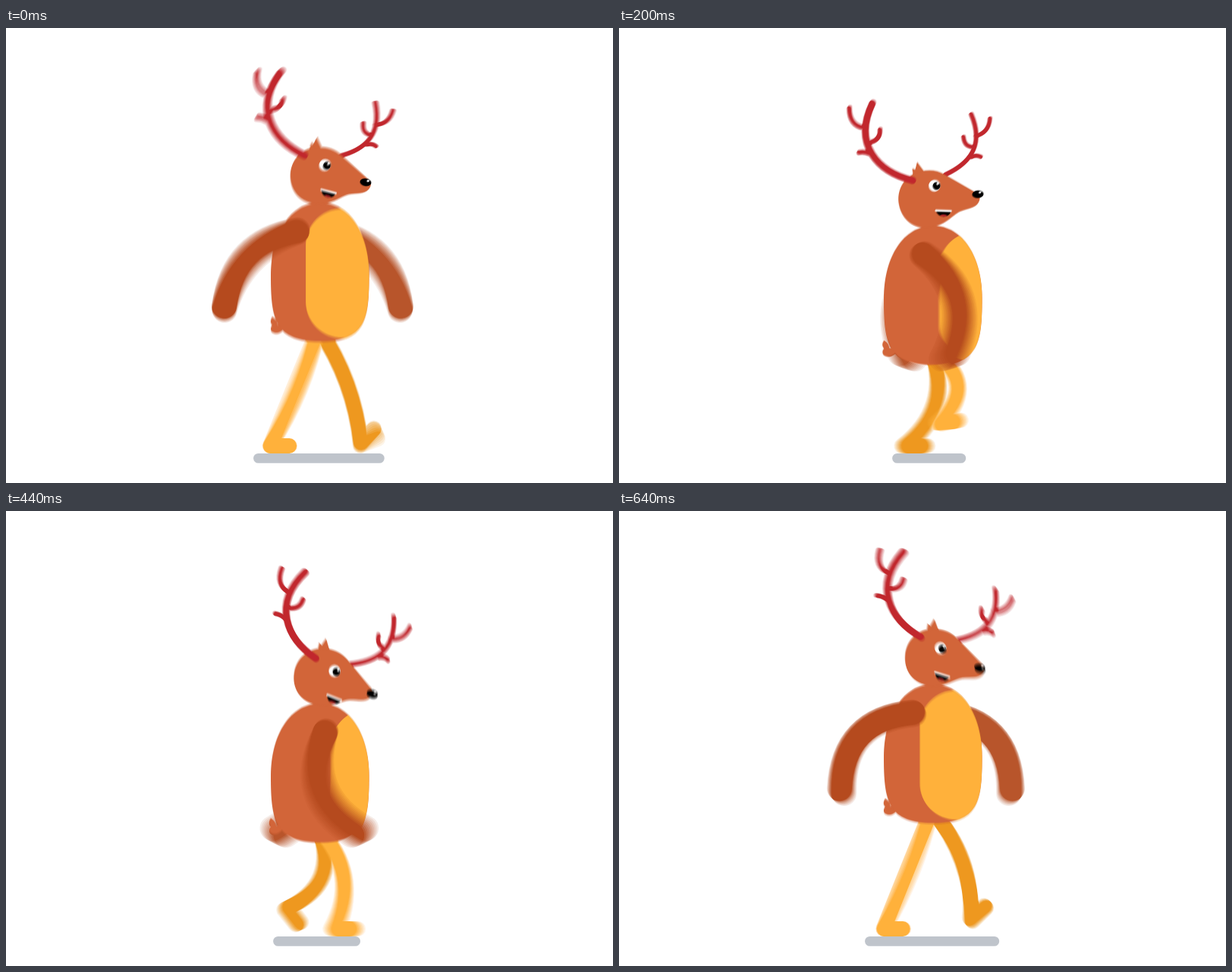
Write an HTML page with a canvas that moves like this. It is 800x600 px and loops after 680 ms.

```html
<!DOCTYPE html>
<html lang="en">
<head>
<meta charset="utf-8">
<title>Walking deer</title>
<style>
  html, body { margin: 0; width: 100%; height: 100%; overflow: hidden; background: #fff; }
  canvas { display: block; }
</style>
</head>
<body>
<canvas id="stage" width="800" height="600"></canvas>
<script>
const W = 800, H = 600;
const LOOP = 680, STEP = 40;
const SHUTTER = 24, SAMPLES = 10;
const LEG_LENGTH = 169, ARM_REACH = 139, FOOT = 25;
const COLOR = {
  skin: '#d26539', nearArm: '#b54a1e', farArm: '#b8552b',
  nearLeg: '#ffb13b', farLeg: '#ee981f', antler: '#c1272d', ground: '#bfc4cb'
};

const stage = document.getElementById('stage').getContext('2d');
const layer = document.createElement('canvas');
layer.width = W;
layer.height = H;
const g = layer.getContext('2d');

const { PI, sin, cos } = Math;
const mod = (a, n) => ((a % n) + n) % n;
const clamp = v => Math.min(1, Math.max(0, v));
const radians = degrees => degrees * PI / 180;
// Cosine over one loop, with its peak at the given time.
const wave = (t, peak) => cos(2 * PI * (t - peak) / LOOP);

// The body dips twice per loop, rising a little faster than it sinks.
function bodyDrop(t) {
  const a = 4 * PI * t / LOOP;
  return 15.5 - 17.5 * cos(a + 0.21 + 0.42 * cos(a - 0.43));
}

const bodyTurn = t => 21 * (1 - wave(t, 0));
const headTilt = t => -0.204 * wave(t, 174);

// The foot swings forward for u in 0..1, then stays on the ground.
function footPose(t) {
  const u = mod(t - 20, LOOP) / 330;
  const lift = u < 1 ? 32 * sin(PI * u ** 0.8) : 0;
  const pitch = u < 0.5
    ? 53 * sin(2 * PI * u)
    : -48 * sin(PI * (u - 0.5)) * clamp((1.03 - u) * 16);
  return {
    x: 403 + 60 * wave(t, 330) + 5 * wave(2 * t, 0),
    y: 551 - lift,
    pitch: radians(pitch)
  };
}

const SHAPE = {
  torso: new Path2D('M414 229C375 229 349 270 349 325C349 385 355 412.5 414 412.5C473 412.5 478.5 385 478.5 325C478.5 270 453 229 414 229Z'),
  tail: new Path2D('M351 380C357 383 357 387 358 390L370 390C366 400 358 403 353 401C348 400 348 393 351 391C348 388 348 384 351 380Z'),
  skull: new Path2D('M411 231C388 231 374.5 214 374.5 194C374.5 172 391 156 412 156C424 156 433 159 441 166L475 196C481 200 483 205 478 211C472 218 462 216 452 218C440 221 432 231 411 231Z'),
  ear: new Path2D('M400 164L401 150L404.500 152.500L409 143L417 160Z'),
  mouth: new Path2D('M415 211L435 216Q432 223 424 222Q416 220 415 211Z'),
  tongue: new Path2D('M419 219.500Q424 217.500 429 221.500Q424 223 419 219.500Z'),
  teeth: new Path2D('M415.500 212L434.500 216.500'),
  antlerNear: new Path2D('M393 167C350 147 325 105 361 57'),
  tinesNear: new Path2D('M343 86C332 82 327 72 330 57M346 107Q362 107 364 93M344 121Q338 117 331 117'),
  antlerFar: new Path2D('M437 168C470 160 495 142 486 97'),
  tinesFar: new Path2D('M486 126Q504 125 509 107M470 124C469 135 474 138 481 140M475 152Q482 150 487 154')
};

function fill(path, color) {
  g.fillStyle = color;
  g.fill(path);
}

function stroke(path, color, width) {
  g.strokeStyle = color;
  g.lineWidth = width;
  g.stroke(path);
}

function oval(x, y, rx, ry, color, angle = 0) {
  g.fillStyle = color;
  g.beginPath();
  g.ellipse(x, y, rx, ry, angle, 0, 2 * PI);
  g.fill();
}

function shifted(x, y, draw) {
  g.save();
  g.translate(x, y);
  draw();
  g.restore();
}

// A curved limb whose middle is pushed sideways by the bend.
function limb(x0, y0, x1, y1, bend) {
  const dx = x1 - x0, dy = y1 - y0, length = Math.hypot(dx, dy);
  const path = new Path2D();
  path.moveTo(x0, y0);
  path.quadraticCurveTo(
    (x0 + x1) / 2 + bend * dy / length,
    (y0 + y1) / 2 - bend * dx / length, x1, y1);
  return path;
}

function drawLeg(t, drop, color) {
  const hipX = 412, hipY = 395 + drop;
  const { x, y, pitch } = footPose(t);
  const slack = LEG_LENGTH ** 2 - (x - hipX) ** 2 - (y - hipY) ** 2;
  const leg = limb(hipX, hipY, x, y, 0.43 * Math.sqrt(Math.max(0, slack)));
  leg.lineTo(x + FOOT * cos(pitch), y + FOOT * sin(pitch));
  stroke(leg, color, 20);
}

function drawArm(t, drop, far) {
  const sway = 21 * (1 - wave(t, 40));
  const swing = radians(-2 - 42 * wave(t, -14));
  const bend = -6 - 64 * Math.tanh(2.2 * wave(t, 545));
  const side = far ? -1 : 1;
  const x = far ? 425 - 0.53 * sway : 382 + sway;
  const y = 267 + drop;
  const arm = limb(x, y,
    x + side * ARM_REACH * sin(swing), y + ARM_REACH * cos(swing), side * bend);
  stroke(arm, far ? COLOR.farArm : COLOR.nearArm, 33);
}

function drawTorso(drop, turn) {
  g.save();
  g.translate(0, drop);
  shifted(-0.06 * turn, 0, () => fill(SHAPE.tail, COLOR.skin));
  fill(SHAPE.torso, COLOR.skin);
  g.clip(SHAPE.torso);
  const belly = new Path2D();
  belly.roundRect(395 + turn, 237, 110, 171, 48);
  fill(belly, COLOR.nearLeg);
  g.restore();
}

function drawHead(t, drop, turn) {
  const tilt = headTilt(t);
  // Face and antlers slide over the skull as the head turns.
  const slide = draw => shifted(0.2 * turn, 14 * tilt + 0.05 * turn, draw);
  g.save();
  g.translate(411, 225 + drop);
  g.rotate(tilt);
  g.translate(-411, -225);
  slide(() => {
    stroke(SHAPE.antlerFar, COLOR.antler, 6);
    stroke(SHAPE.tinesFar, COLOR.antler, 5.5);
  });
  fill(SHAPE.ear, COLOR.skin);
  fill(SHAPE.skull, COLOR.skin);
  slide(() => {
    stroke(SHAPE.tinesNear, COLOR.antler, 6);
    stroke(SHAPE.antlerNear, COLOR.antler, 9);
    oval(420, 179.5, 7.8, 7.8, '#fff');
    oval(422.5, 180.3, 5, 5, '#000');
    oval(424.6, 177.8, 1.7, 1.7, '#fff');
    oval(473.8, 201.8, 7.5, 5, '#000', 0.15);
    oval(477, 200, 1.8, 1.4, '#fff');
    fill(SHAPE.mouth, '#000');
    fill(SHAPE.tongue, COLOR.antler);
    stroke(SHAPE.teeth, '#fff', 2.8);
  });
  g.restore();
}

function drawDeer(t) {
  const drop = bodyDrop(t), turn = bodyTurn(t);
  g.fillStyle = '#fff';
  g.fillRect(0, 0, W, H);
  g.lineCap = g.lineJoin = 'round';
  drawArm(t, drop, true);
  drawLeg(t + LOOP / 2, drop, COLOR.farLeg);
  drawLeg(t, drop, COLOR.nearLeg);
  drawTorso(drop, turn);
  drawArm(t, drop, false);
  drawHead(t, drop, turn);
}

function drawGround(drop) {
  const left = 325 + 1.1 * drop, right = 500 - 1.34 * drop;
  stage.fillStyle = COLOR.ground;
  stage.beginPath();
  stage.roundRect(left, 561, right - left, 12.8, 6.4);
  stage.fill();
}

function render(t) {
  // Motion blur: a running average of poses across the shutter time.
  for (let i = 0; i < SAMPLES; i++) {
    drawDeer(t + SHUTTER * ((i + 0.5) / SAMPLES - 0.5));
    stage.globalAlpha = 1 / (i + 1);
    stage.drawImage(layer, 0, 0);
  }
  stage.globalAlpha = 1;
  drawGround(bodyDrop(t));
}

let shown = -1;
function tick() {
  const t = Math.floor(mod(performance.now() + 1, LOOP) / STEP) * STEP;
  if (t !== shown) render(shown = t);
  requestAnimationFrame(tick);
}
tick();
</script>
</body>
</html>
```
